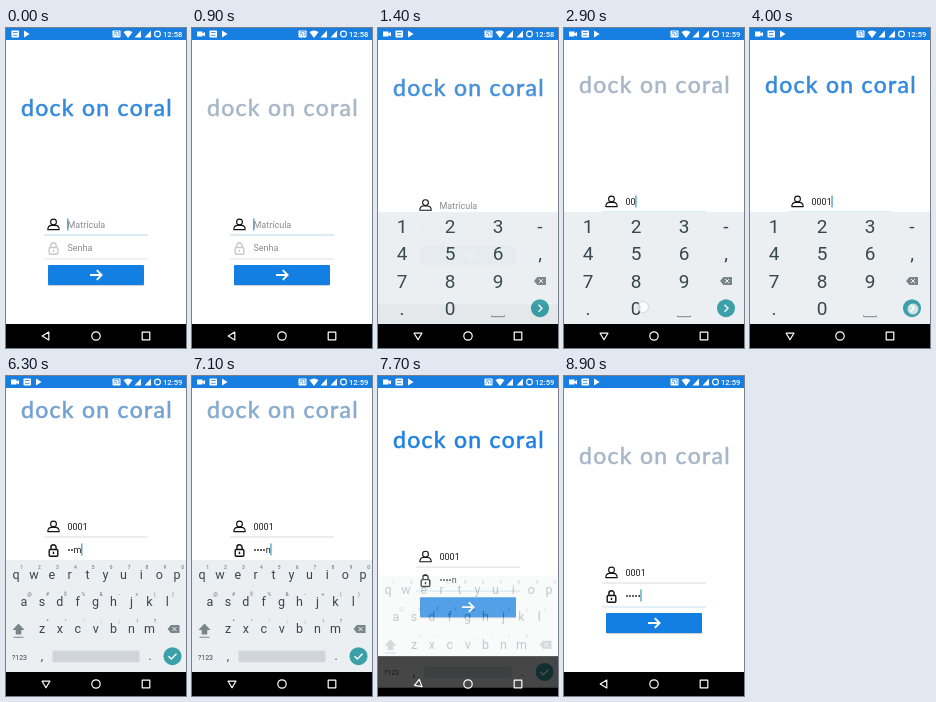
Write an HTML page that moves like this. It is 180 px wide and 320 px high and loops after 9 s.

```html
<!DOCTYPE html>
<html lang="pt">
<head>
<meta charset="utf-8">
<title>Login</title>
<style>
  html, body { margin: 0; width: 100%; height: 100%; overflow: hidden; background: #fff; }
  svg { display: block; width: 100vw; height: 100vh; }
  text { font-family: Roboto, Arial, sans-serif; }
  .logo { font: 400 23px Lato, sans-serif; letter-spacing: 1.3px; stroke-width: .6; stroke-linejoin: round; }
  .field { font-size: 9px; }
  .keys { fill: #37474f; text-anchor: middle; }
</style>
</head>
<body>
<svg viewBox="0 0 180 320">
  <rect width="180" height="320" fill="#fff"/>
  <g id="page">
    <text id="logo" class="logo" x="91" y="87.5" text-anchor="middle">dock on coral</text>
    <g fill="none" stroke="#111" stroke-width="1.1">
      <circle cx="47.5" cy="194" r="2.9"/>
      <path d="M41.8 201.6c0-2.6 1.5-4.2 3.8-4.2h3.8c2.3 0 3.8 1.6 3.8 4.2z" stroke-linejoin="round"/>
    </g>
    <g id="lock" fill="none" stroke-width="1.4">
      <rect x="43.2" y="219.5" width="8.6" height="6.8" rx="1"/>
      <path d="M44.9 219v-1.6a2.6 2.6 0 0 1 5.2 0v1.6M47.5 221.8v2.2"/>
    </g>
    <path id="lineUser" d="M38 207h104" stroke-width=".8"/>
    <path id="linePass" d="M38 231h104" stroke-width=".6"/>
    <text id="user" class="field" x="61.5" y="200"/>
    <text id="pass" class="field" x="61.5" y="223"/>
    <rect id="cursor" width="1.2" height="12" fill="#3a9bb5"/>
    <rect x="42" y="238" width="96" height="20" rx="1" fill="#000" opacity=".18"/>
    <rect x="42" y="237" width="96" height="20" rx="1" fill="#147fe3"/>
    <path d="M84 247h11M90.8 242.2l4.8 4.8-4.8 4.8" fill="none" stroke="#fff" stroke-width="1.9"/>
    <rect y="296" width="180" height="80"/>
  </g>
  <g id="status" fill="#fff">
    <rect width="180" height="12" fill="#177fe2"/>
    <path id="camera" d="M5 3.5h5.5v2l2.5-1.6v4.6l-2.5-1.6v1.6H5z"/>
    <g id="notices">
      <rect x="5.5" y="2.5" width="7.5" height="7" rx=".8"/>
      <path d="M7 4.5h4.5M7 7.3h4.5" stroke="#177fe2" stroke-width=".8"/>
      <path d="M18 2.4l5.6 3.6-5.6 3.6z"/>
    </g>
    <rect x="106.5" y="2.5" width="8" height="7" rx=".8"/>
    <path d="M108 8v-1.2M108 5a3 3 0 0 1 3 3M108 3.8h5V8" fill="none" stroke="#177fe2" stroke-width=".7"/>
    <path d="M117.5 4q4.5-3.2 9 0l-4.5 6zM128.5 9.5l6.5-7v7zM138.5 9.5l6.5-7v7z"/>
    <circle cx="151.5" cy="6" r="2.9" fill="none" stroke="#fff" stroke-width="1.1"/>
    <text id="clock" x="157" y="9" font-size="7.6" font-weight="500"/>
  </g>
  <g id="keyboard">
    <rect y="184" width="180" height="112" fill="#eceff1"/>
    <g id="numeric" class="keys"></g>
    <g id="letters" class="keys"></g>
  </g>
  <circle id="touch" r="5.5" fill="#fff" fill-opacity=".75" stroke="#9aa3a8" stroke-opacity=".5" stroke-width=".7"/>
  <g fill="none" stroke="#fff" stroke-width="1.2" stroke-linejoin="round">
    <path id="back" d="M36.2 308l6.6-3.9v7.8z"/>
    <circle cx="90" cy="308" r="4.2"/>
    <rect x="136.2" y="304.2" width="7.6" height="7.6"/>
  </g>
</svg>
<script>
const LOOP = 9000;
const $ = id => document.getElementById(id);
const set = (el, attrs) => { for (const k in attrs) el.setAttribute(k, attrs[k]); };
const show = (el, on) => set(el, { visibility: on ? 'visible' : 'hidden' });
const progress = (t, start, length) => Math.min(1, Math.max(0, (t - start) / length));
const easeOut = p => 1 - (1 - p) ** 2;

function add(parent, tag, attrs, label = '') {
  const el = document.createElementNS('http://www.w3.org/2000/svg', tag);
  set(el, attrs);
  el.textContent = label;
  parent.append(el);
  return el;
}
const key = (parent, label, x, y, size, fill = '#37474f') =>
  add(parent, 'text', { x, y, 'font-size': size, fill }, label);

function backspace(parent, x, y) {
  add(parent, 'path', { d: `M${x - 6} ${y}l3.4-4h8.6v8h-8.6z`, fill: '#78858b' });
  add(parent, 'path', { d: `M${x - 1} ${y - 2}l4 4m0-4l-4 4`, stroke: '#eceff1', 'stroke-width': 1 });
}
function action(parent, x, mark) {
  add(parent, 'circle', { cx: x, cy: 280.2, r: 9, fill: '#3ba0a8' });
  add(parent, 'path', { d: mark, fill: 'none', stroke: '#fff', 'stroke-width': 1.4 });
}

function buildNumeric() {
  const g = $('numeric');
  ['123-', '456,', '789', '.0'].forEach((row, r) =>
    [...row].forEach((c, i) => key(g, c, [24, 72, 120, 162][i], 204.7 + r * 27.4, 19)));
  add(g, 'path', { d: 'M113.5 287.5v1.2h13v-1.2', fill: 'none', stroke: '#78858b', 'stroke-width': 1 });
  backspace(g, 162, 253);
  action(g, 162, 'M160.5 276.7l3.5 3.5-3.5 3.5');
}

const ROWS = [
  ['qwertyuiop', '1234567890', 10, 202.5],
  ['asdfghjkl', '@#$%&-+()', 18, 229.5],
  ['zxcvbnm', '*"\':;!?', 36, 257]
];
const spots = { 0: [79, 279], 1: [25, 199], next: [163, 281] };

function buildLetters() {
  const g = $('letters');
  for (const [chars, hints, x0, y] of ROWS) {
    [...chars].forEach((c, i) => {
      const x = x0 + i * 17.9;
      spots[c] = [x + 1, y - 3];
      key(g, c, x, y, 12.5);
      set(key(g, hints[i], x + 5.6, y - 10, 5, '#78858b'), { 'font-weight': 500 });
    });
  }
  add(g, 'path', { d: 'M12.5 247.5l6 6.5h-3.2v4.5h-5.6V254H6.5zM7.5 260.7h10v1.1h-10z', fill: '#78858b' });
  backspace(g, 167.5, 253);
  key(g, '?123', 13.5, 283.5, 7);
  key(g, ',', 36, 284, 12);
  add(g, 'rect', { x: 46.5, y: 274.8, width: 87, height: 11.5, rx: 1.2, fill: '#cfd5d8' });
  key(g, '.', 144, 284, 12);
  action(g, 166.5, 'M162.5 280.3l2.8 2.8 5.2-5.4');
}

buildNumeric();
buildLetters();

// [time, key]
const USER_KEYS = [[2450, '0'], [2820, '0'], [3150, '0'], [3600, '1']];
const PASS_KEYS = [[5450, 'a'], [5800, 'd'], [6150, 'm'], [6600, 'i'], [6950, 'n']];
const TOUCHES = [...USER_KEYS, [4050, 'next'], ...PASS_KEYS];
const SWITCH = 4200, MASK_DELAY = 1500;

function passwordAt(typed, t) {
  return typed.map(([at, c], i) =>
    i === typed.length - 1 && t < at + MASK_DELAY ? c : '•').join('');
}

function fillField(el, value, hint) {
  el.textContent = value || hint;
  set(el, { fill: value ? '#1b1b1b' : '#8c8c8c' });
  return value ? el.getComputedTextLength() : 0;
}

function drawLogo(t) {
  const grey = (1 - Math.cos((t - 1750) / 1000 * Math.PI)) / 2;
  const mix = [[30, 130, 226], [176, 186, 199]]
    .reduce((a, b) => a.map((v, i) => Math.round(v + (b[i] - v) * grey)));
  const color = `rgb(${mix})`;
  set($('logo'), { fill: color, stroke: color });
}

function drawKeyboard(t) {
  const closing = progress(t, 7570, 200);
  const slide = easeOut(progress(t, 1180, 220)) * (1 - closing);
  const fade = easeOut(progress(t, 1200, 240)) * (1 - closing) ** 1.15;
  const onLetters = t >= SWITCH;
  set($('keyboard'), { opacity: fade, transform: `translate(0 ${24 * (1 - slide)})` });
  $('numeric').style.display = onLetters ? 'none' : '';
  $('letters').style.display = onLetters ? '' : 'none';
  set($('back'), { transform: `rotate(${-90 * slide ** 1.4} 40 308)` });

  const pan = (23 * easeOut(progress(t, 1220, 300)) + 23 * easeOut(progress(t, SWITCH, 250))) * (1 - closing);
  set($('page'), { transform: `translate(0 ${-pan})` });
}

function drawFields(t) {
  const past = ([at]) => t >= at;
  const typedUser = USER_KEYS.filter(past), typedPass = PASS_KEYS.filter(past);
  const onPass = t >= SWITCH;
  const userWidth = fillField($('user'), typedUser.map(k => k[1]).join(''), 'Matrícula');
  const passWidth = fillField($('pass'), passwordAt(typedPass, t), 'Senha');
  const lineColor = on => on ? '#9fcfea' : '#d2d2d2';
  set($('lineUser'), { stroke: lineColor(!onPass) });
  set($('linePass'), { stroke: lineColor(onPass) });
  set($('lock'), { stroke: onPass ? '#111' : '#c9c9c9' });

  const justTyped = TOUCHES.some(([at]) => t >= at && t < at + 500);
  set($('cursor'), {
    x: 61.2 + (onPass ? passWidth : userWidth),
    y: onPass ? 213.5 : 190.5
  });
  show($('cursor'), justTyped || (t + 200) % 1000 < 500);
}

function drawTouch(t) {
  const hit = TOUCHES.find(([at]) => t >= at - 60 && t < at + 110);
  show($('touch'), !!hit);
  if (hit) set($('touch'), { cx: spots[hit[1]][0], cy: spots[hit[1]][1] });
}

function drawStatus(t) {
  const recording = t >= 300;
  show($('camera'), recording);
  set($('notices'), { transform: `translate(${recording ? 12 : 0} 0)` });
  $('clock').textContent = t < 2500 ? '12:58' : '12:59';
}

function draw(t) {
  drawLogo(t);
  drawKeyboard(t);
  drawFields(t);
  drawTouch(t);
  drawStatus(t);
}

const start = performance.now();
function tick() {
  draw((performance.now() - start) % LOOP);
  requestAnimationFrame(tick);
}
tick();
</script>
</body>
</html>
```
